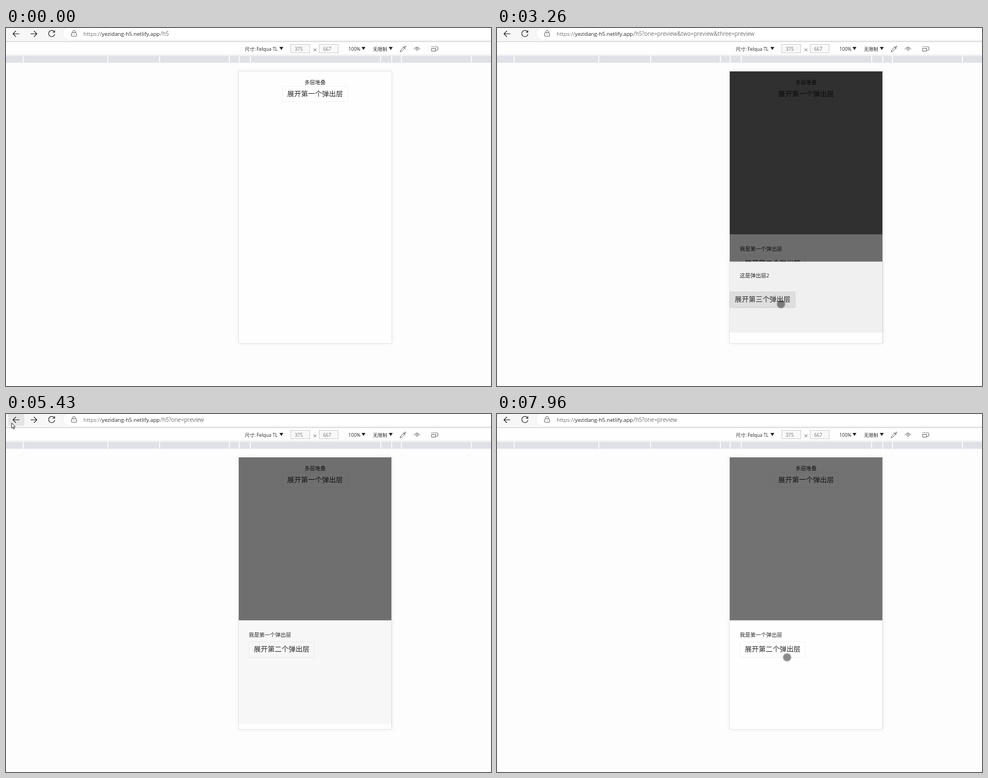
An HTML page for the animation above (8 s loop, 871 px wide and 643 px high).

```html
<!DOCTYPE html>
<html lang="zh">
<head>
<meta charset="utf-8">
<style>
  html, body { margin: 0; width: 100%; height: 100%; overflow: hidden; background: #fdfdfd; }
  svg { display: block; font: 9.5px "Open Sans", "Noto Sans CJK SC", "Noto Sans CJK", sans-serif; }
  text { fill: #2b2b2b; white-space: pre; }
  .big { font-size: 12.5px; }
  .tool { font-size: 8.5px; }
  .url { font-size: 9.7px; }
  .query { font-size: 9.9px; }
  .dim { fill: #707070; }
  .line { fill: none; stroke: #222; stroke-width: 1.1; stroke-linecap: round; stroke-linejoin: round; }
  .thin { stroke: #666; stroke-width: 1; }
</style>
</head>
<body>
<svg id="stage" width="871" height="643" viewBox="0 0 871 643"></svg>
<script>
const LOOP = 8000, FADE = 300, STEP = 156.5;
const PAGE = { x: 418, y: 78, w: 274.4, h: 488 }, BOTTOM = PAGE.y + PAGE.h, CENTER = 555;

// Pointer moves: start, end, x, y; it rests in between
const moves = [
  [440, 440, 617, 249], [440, 910, 545, 130], [1130, 1370, 555, 125],
  [1850, 2480, 515, 430], [2790, 3100, 510, 496], [3740, 3880, 10, 16],
  [6080, 6700, 520, 109], [7050, 7160, 537, 139], [7170, 7950, 521, 437]
];

// Sheet height and its [open, close] times
const sheets = [
  { h: 195.4, spans: [[1601, 5585], [7046, 9999]] },
  { h: 146.4, spans: [[2590, 5159]] },
  { h: 68, spans: [[3203, 4573]] }
];

const rect = (x, y, w, h, fill, more = '') =>
  `<rect x="${x}" y="${y}" width="${w}" height="${h}" fill="${fill}" ${more}/>`;
const pageRect = (fill, more, grow = 0) =>
  rect(PAGE.x - grow, PAGE.y - grow, PAGE.w + 2 * grow, PAGE.h + 2 * grow, fill, more);
const text = (x, y, s, cls = '', more = '') => `<text x="${x}" y="${y}" class="${cls}" ${more}>${s}</text>`;
const line = (d, cls = '') => `<path class="line ${cls}" d="${d}"/>`;
const caret = x => `<path d="M${x} 34h7l-3.5 5.5z" fill="#222"/>`;
const field = (x, s) => rect(x + .5, 29.5, 34, 15, '#f8f8f8', 'stroke="#cfcfcf"') + text(x + 7.5, 40.5, s, 'tool dim');
const button = (id, x, y, label) =>
  rect(x + .5, y + .5, 117, 28, '#fefefe', `id="${id}" stroke="#f1f1f2" rx="2"`) +
  text(x + 9, y + 18.5, label, 'big');

const contents = [
  text(18, 29, '我是第一个弹出层') + button('b1', 18, 38, '展开第二个弹出层'),
  text(18, 28, '这是弹出层2') + button('b2', 0, 54, '展开第三个弹出层'),
  text(18, 28, '这是弹出层3')
];
const layers = contents.map((c, i) => pageRect('#000', `id="shade${i}"`) +
  `<g id="sheet${i}">${rect(0, 0, PAGE.w, sheets[i].h, '#fefefe')}${c}</g>`).join('');
const query = ['?one', '&amp;two', '&amp;three'].map((k, i) => `<tspan id="q${i}">${k}=preview</tspan>`).join('');

const browserBar = rect(0, 0, 871, 24, '#f7f7f7') +
  rect(4, -4, 29, 25, '#e4e4e4', 'id="hover" rx="3"') +
  line('M23.5 10.5H12.5M17.5 5.5l-5 5 5 5') +
  `<g id="forward">${line('M44.5 10.5h11M50.5 5.5l5 5-5 5')}</g>
  <g id="bar">
    ${line('M87 7.2A5.6 5.6 0 1 0 87.6 11M87.4 4.5v3.2h-3.2')}
    ${rect(102, -2, 900, 24, '#fff', 'rx="12" stroke="#ececec"')}
    ${rect(117.5, 8.5, 9, 6.5, 'none', 'rx="1" stroke="#666"')}
    ${line('M119.5 8.5v-1.5a2.5 2.5 0 0 1 5 0v1.5M122 11.5v.5', 'thin')}
    ${text(139, 14, 'https://', 'url dim')}
    ${text(172, 14, 'yezidang-h5.netlify.app', 'url')}
    ${text(277, 14, '/h5' + query, 'query dim')}
  </g>` + rect(0, 24, 871, 1, '#c8c8c8');

// Ruler marks mirror around the page centre
const marks = [117, 137, 154.5, 280, 373, 525].flatMap(d => [CENTER - d, CENTER + d]);
const deviceBar = rect(0, 25, 871, 24, '#fefefe') + rect(0, 48, 871, 1, '#e4e4e4') +
  text(429, 40.5, '尺寸:', 'tool') + text(450, 40.5, 'Felqua TL', 'tool') + caret(491) +
  field(511, '375') + line('M552.5 37l4.5 4.5m0-4.5l-4.5 4.5', 'thin') + field(562, '667') +
  text(615, 40.5, '100%', 'tool') + caret(638.5) + text(659, 40.5, '无限制', 'tool') + caret(687.5) +
  line('M708 42.5l1-3 5-5 2 2-5 5zM713 33.5l4 4M715 35l2-3 1.5 1.5-2.5 2.5', 'thin') +
  line('M732.5 38q5.5-8 11 0', 'thin') + '<circle cx="738" cy="38" r="2" class="line thin"/>' +
  line('M764.5 36.5h7v5h-7zM764.5 33.5h1m2 0h1m2 0h1M773 33.5q3 0 3 3.5t-3 3.5', 'thin') +
  rect(0, 50, 871, 12.5, '#dfe1e6') +
  marks.map(x => rect(x, 50, 1.5, 12.5, '#fff')).join('');

const $ = id => document.getElementById(id);
$('stage').innerHTML = `
  <defs>
    <clipPath id="clip">${pageRect('#000')}</clipPath>
    <filter id="soft" x="-10%" y="-10%" width="120%" height="120%"><feGaussianBlur stdDeviation="4"/></filter>
  </defs>
  ${rect(0, 0, 871, 643, '#fdfdfd')}
  ${browserBar}${deviceBar}
  ${pageRect('#000', 'opacity=".07" filter="url(#soft)"')}
  ${pageRect('#fefefe', 'stroke="#e6e6e6"', .5)}
  <g clip-path="url(#clip)">
    ${text(CENTER, 100.5, '多层堆叠', '', 'text-anchor="middle"')}
    ${button('b0', 496, 104, '展开第一个弹出层')}
    ${layers}
    <g id="status">
      ${rect(415, 550, 93, 20, '#cfcfcf', 'rx="2"')}
      ${text(422, 561.5, '正在等待 yezidang-...', 'tool')}
    </g>
  </g>
  <g id="touch"><circle r="8" opacity=".2"/><circle r="6.6" opacity=".31"/></g>
  <path id="arrow" d="M0 0v9.5l2.2-2 1.6 3.5 1.5-.7-1.6-3.3h3z" fill="#fff" stroke="#222" stroke-width=".9"/>`;

const clamp = v => Math.max(0, Math.min(1, v));
const smooth = p => p * p * (3 - 2 * p);
const show = (id, on) => $(id).setAttribute('visibility', on ? 'visible' : 'hidden');
const place = (id, x, y) => $(id).setAttribute('transform', `translate(${x} ${y})`);

// cubic-bezier(0, 0, .58, 1), solved by bisection
function easeOut(p) {
  let a = 0, b = 1;
  for (let i = 0; i < 20; i++) {
    const s = (a + b) / 2;
    if (1.74 * s * s - .74 * s ** 3 < p) a = s; else b = s;
  }
  return smooth(a);
}

function pointerAt(t) {
  let x = -50, y = -50;
  for (const [start, end, toX, toY] of moves) {
    if (t < start) break;
    const p = end > start ? smooth(clamp((t - start) / (end - start))) : 1;
    x += (toX - x) * p;
    y += (toY - y) * p;
  }
  return [x, y];
}

function drawSheet({ h, spans }, i, t) {
  const [open, close] = spans.findLast(s => t >= s[0]) || [LOOP, LOOP];
  const isOpen = t >= open && t < close;
  const p = clamp((t - (isOpen ? open : close)) / FADE);
  let rise = 0, shade = 0;
  if (isOpen) {
    rise = easeOut(p);
    shade = clamp(1.43 * p - .155);
  } else if (t >= close) {
    rise = easeOut(1 - p);
    shade = 1 - p ** 1.4;
  }
  place('sheet' + i, PAGE.x, BOTTOM - h * rise);
  $('shade' + i).setAttribute('opacity', .55 * shade);
  show('q' + i, isOpen);
  const pressed = isOpen && t < open + 320;
  $('b' + i).setAttribute('fill', pressed ? '#ebebeb' : '#fefefe');
  $('b' + i).setAttribute('stroke', pressed ? '#dcdcdc' : '#f1f1f2');
}

function draw(now) {
  const t = Math.max(0, 440 + STEP * Math.floor((now % LOOP - 412) / STEP));
  sheets.forEach((s, i) => drawSheet(s, i, t));

  const [[firstOpen], [reopen]] = sheets[0].spans, wentBack = sheets[2].spans[0][1];
  const hasForward = t < firstOpen || (t >= wentBack && t < reopen);
  show('forward', hasForward);
  place('bar', hasForward ? 0 : -32, 0);
  show('hover', t >= 4170 && t < 6200);
  show('status', t >= firstOpen && t < 1950);

  const [x, y] = pointerAt(t), inPage = x > PAGE.x && y > PAGE.y;
  show('touch', inPage);
  show('arrow', !inPage);
  place(inPage ? 'touch' : 'arrow', x, y);
  requestAnimationFrame(draw);
}
requestAnimationFrame(draw);
</script>
</body>
</html>
```
